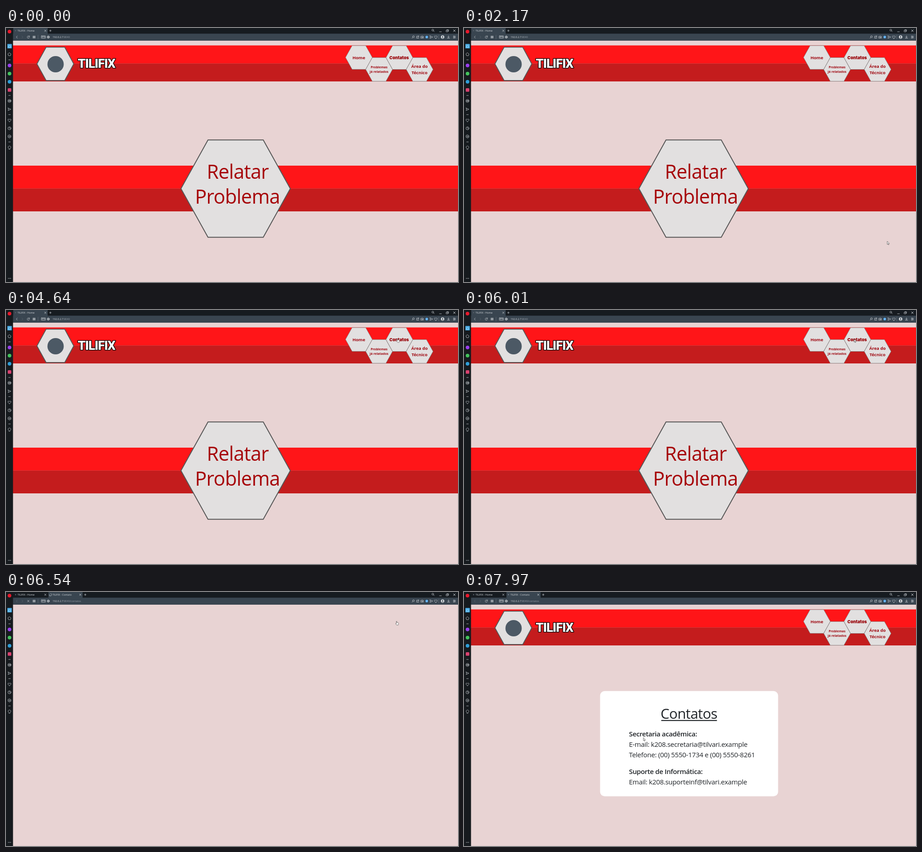
An HTML page for the animation above (8 s loop, 998 by 561 pixels).

```html
<!DOCTYPE html>
<html lang="pt-BR">
<head>
<meta charset="utf-8">
<title>Contatos</title>
<style>
html, body { margin: 0; width: 100%; height: 100%; overflow: hidden; background: #e8d3d3; }
svg { display: block; width: 100vw; height: 100vh; }
text { font-family: "Open Sans", "Noto Sans", sans-serif; }
.mid { text-anchor: middle; }
.ui { font-size: 5.6px; fill: #d9dde1; }
.dim { fill: #98a1aa; }
.ico { fill: none; stroke: #c9ced3; stroke-width: .8; stroke-linecap: round; stroke-linejoin: round; }
.off { stroke: #5c6670; }
.nav { fill: #e2e0e0; stroke: #777; stroke-width: .8; }
.link { fill: #9f0710; font-weight: 700; }
.brand { font: 900 27.5px Roboto, sans-serif; letter-spacing: -1.1px; fill: #fff; stroke: #000; stroke-width: 2.6px; paint-order: stroke; stroke-linejoin: round; }
.big { font-size: 43px; letter-spacing: -.8px; fill: #a60307; }
.body { font-size: 15px; letter-spacing: -.3px; fill: #212529; }
.body .b { font-weight: 600; letter-spacing: -.4px; }

/* hard switches */
.home, .blank, .later, .header, .card, .loading, .loaded, .arrow, .hand, .tab2 { animation: 8s step-end infinite; }
.home { animation-name: home; }
.blank { animation-name: blank; }
.later { animation-name: later; }
.tab2 { animation-name: tab; }
.header { animation-name: header; }
.card { animation-name: card; }
.loading { animation-name: loading; }
.loaded { animation-name: loaded; }
.arrow { animation-name: arrow; }
.hand { animation-name: hand; }
@keyframes home { 0% { opacity: 1 } 77.125%, 100% { opacity: 0 } }
@keyframes blank { 0% { opacity: 0 } 77.125% { opacity: 1 } 80.625%, 100% { opacity: 0 } }
@keyframes later { 0% { opacity: 0 } 80.625%, 100% { opacity: 1 } }
@keyframes tab { 0% { opacity: 0 } 77.125%, 100% { opacity: 1 } }
@keyframes header { 0% { opacity: 1 } 77.125% { opacity: 0 } 83%, 100% { opacity: 1 } }
@keyframes card { 0% { opacity: 0 } 83%, 100% { opacity: 1 } }
@keyframes loading { 0% { opacity: 0 } 77.125% { opacity: 1 } 85%, 100% { opacity: 0 } }
@keyframes loaded { 0% { opacity: 0 } 85%, 100% { opacity: 1 } }
@keyframes arrow { 0% { opacity: 0 } 23.75% { opacity: 1 } 45.5% { opacity: 0 } 73.875% { opacity: 1 } 80% { opacity: 0 } 88%, 100% { opacity: 1 } }
@keyframes hand { 0% { opacity: 0 } 45.5% { opacity: 1 } 73.875% { opacity: 0 } 80% { opacity: 1 } 88%, 100% { opacity: 0 } }

/* new tab opening */
.grow { animation: grow 8s infinite; }
.plus { animation: plus 8s infinite; }
.spot { animation: spot 8s infinite; }
.spin { animation: spin 1s linear infinite; }
@keyframes grow { 0%, 77.6% { width: 0 } 80%, 100% { width: 75.5px } }
@keyframes plus { 0%, 77.6% { transform: translateX(0) } 80%, 100% { transform: translateX(77px) } }
@keyframes spot { 0%, 77.6% { transform: translate(89px, 6px) } 80%, 100% { transform: translate(98px, 6px) } }
@keyframes spin { to { transform: rotate(360deg) } }

.cursor { animation: move 8s linear infinite; }
@keyframes move {
  0%, 23.75% { transform: translate(930px, 425px) }
  27.125%, 31.25% { transform: translate(934.5px, 471px) }
  36% { transform: translate(925px, 370px) }
  41.25% { transform: translate(909px, 226px) }
  46.25% { transform: translate(899px, 105px) }
  51.75% { transform: translate(884px, 68px) }
  55%, 58.2% { transform: translate(863.3px, 62.4px) }
  62% { transform: translate(872px, 65px) }
  67% { transform: translate(866px, 66px) }
  70%, 86.25% { transform: translate(861.3px, 64px) }
  89% { transform: translate(780px, 130px) }
  93% { transform: translate(560px, 310px) }
  95.6% { transform: translate(430px, 366px) }
  98% { transform: translate(398px, 325px) }
  99.5%, 100% { transform: translate(396px, 321.5px) }
}
</style>
</head>
<body>
<svg viewBox="0 0 998 561" preserveAspectRatio="none">
  <defs>
    <path id="hex" d="M-29.6 0L-15-26.2H15L29.6 0 15 26.2H-15Z"/>
    <path id="x" d="M-1.8-1.8L1.8 1.8M1.8-1.8L-1.8 1.8"/>
    <path id="heart" d="M0 3C-6-.8-2.8-4.6 0-1.8 2.8-4.6 6-.8 0 3Z"/>
    <path id="send" d="M-3-2.8L3.2 0-3 2.8-2 0Z"/>
    <path id="dash" d="M-2 0H2"/>
    <path id="reload" d="M2.1-1.3A2.5 2.5 0 1 0 2.4.9M2.5-2.8V-.9H.6"/>
    <path id="back" d="M1-2.3L-1.4 0 1 2.3"/>
    <path id="fwd" d="M-1-2.3L1.4 0-1 2.3"/>
    <path id="lens" d="M.8.8L2.6 2.6M1.3-.8A2 2 0 1 1-2.7-.8 2 2 0 1 1 1.3-.8"/>
    <g id="cam"><path d="M-2.8-1.6H-1.2L-.6-2.5H.6L1.2-1.6H2.8V2.3H-2.8Z"/><circle cy=".4" r="1"/></g>
    <g id="tools">
      <use href="#lens" transform="translate(899 20) scale(-1 1)"/>
      <path d="M909 18H906.7V22.5H911.2V20.8M908.5 20.5L911.4 17.6M909.7 17.6H911.4V19.3"/>
      <use href="#cam" x="919" y="20"/>
      <use href="#send" x="939" y="20"/>
      <use href="#heart" x="949" y="20.3"/>
      <circle cx="929" cy="20" r="2.9" fill="#4da6ef" stroke="none"/>
      <path d="M927.8 20L928.7 20.9 930.3 19.2" stroke="#fff"/>
    </g>
  </defs>

  <!-- pages -->
  <rect width="998" height="561" fill="#e8d3d3"/>
  <g class="blank"><rect x="15" y="28" width="983" height="533" fill="#fff"/></g>

  <g class="header">
    <rect x="15" y="38.5" width="983" height="40" fill="#ff1518"/>
    <rect x="15" y="78.3" width="983" height="39.7" fill="#c41c1d"/>
    <path d="M68.3 79.2L88.6 42.4H129.6L149.6 79.2 129.6 116H88.6Z" fill="#e2e0e0" stroke="#555" stroke-width="1.8"/>
    <circle cx="109.5" cy="80" r="18" fill="#4c5965"/>
    <text class="brand" x="158.5" y="88">TILIFIX</text>
    <use href="#hex" class="nav" x="779.2" y="65.1"/>
    <use href="#hex" class="nav" x="823.8" y="91.5"/>
    <use href="#hex" class="nav" x="868.6" y="65.3"/>
    <use href="#hex" class="nav" x="913.3" y="91.5"/>
    <g class="link mid" font-size="9.5">
      <text x="779" y="68.6">Home</text>
      <text x="823.7" y="89.1" font-size="7">Problemas</text>
      <text x="823.7" y="99" font-size="7">já relatados</text>
      <text x="868" y="68.8" style="font:900 9.3px Inter,sans-serif" fill="#980006">Contatos</text>
      <text x="913" y="88.4">Área do</text>
      <text x="913" y="101.6">Técnico</text>
    </g>
  </g>

  <g class="home">
    <rect x="15" y="304" width="983" height="50.7" fill="#ff1518"/>
    <rect x="15" y="354.5" width="983" height="50.5" fill="#c41c1d"/>
    <path d="M386.3 354.8L446 247.3H568L627.7 354.8 568 462.2H446Z" fill="#e2e0e0" stroke="#565656" stroke-width="2"/>
    <g class="big mid">
      <text x="511.5" y="332.5">Relatar</text>
      <text x="511" y="387.5">Problema</text>
    </g>
  </g>

  <g class="card">
    <rect x="300.5" y="218.8" width="393" height="232.4" rx="10" fill="#fff"/>
    <text class="mid" x="496.7" y="280" font-size="31" letter-spacing="-.6" fill="#212529">Contatos</text>
    <rect x="435.5" y="282.7" width="123" height="2.2" fill="#212529"/>
    <g class="body">
      <text class="b" x="364.3" y="319">Secretaria acadêmica:</text>
      <text x="364.3" y="342">E-mail: k208.secretaria@tilvari.example</text>
      <text x="364.3" y="364.7">Telefone: (00) 5550-1734 e (00) 5550-8261</text>
      <text class="b" x="364.3" y="402.4">Suporte de Informática:</text>
      <text x="364.3" y="425.2">Email: k208.suporteinf@tilvari.example</text>
    </g>
  </g>

  <!-- tab strip -->
  <rect width="998" height="13" fill="#161b20"/>
  <rect x="15" y="12.5" width="983" height="15.5" fill="#394550"/>
  <g class="home"><rect x="16" y="0" width="76" height="13" fill="#394550"/></g>
  <g class="tab2"><rect class="grow" x="93.7" y="0" height="13" fill="#394550"/></g>
  <rect x="20" y="4.7" width="2.4" height="2.4" fill="#59616a"/>
  <text class="ui" x="25.6" y="8.1">TILIFIX - Home</text>
  <g class="later">
    <text class="ui" x="102.5" y="8.1">TILIFIX - Contato</text>
    <use href="#x" class="ico" x="164" y="6"/>
  </g>
  <g class="loaded"><rect x="97" y="4.7" width="2.4" height="2.4" fill="#737b84"/></g>
  <g class="loading ico"><g class="spot"><path class="spin" d="M0 2.6A2.6 2.6 0 1 1 2.6 0"/></g></g>
  <g class="ico">
    <use href="#x" x="86.8" y="6"/>
    <path class="plus" d="M96 6H100M98 4V8"/>
    <use href="#lens" x="943" y="5.5"/>
    <path d="M957 8.3H961.5M972.2 5H975.8V8.4H972.2ZM973.5 5V3.7H977.1V7.1H975.8"/>
    <use href="#x" x="990" y="6" transform="translate(-198 -1.2) scale(1.2)"/>
  </g>

  <!-- address bar -->
  <g class="ico">
    <path d="M59.8 17.8H61.6V19.4H59.8ZM62.8 17.8H64.6V19.4H62.8ZM59.8 20.6H61.6V22.2H59.8ZM62.8 20.6H64.6V22.2H62.8Z"/>
    <path d="M70.8 15.5V24.5M955.5 15.5V24.5" stroke="#65707a"/>
    <rect x="78" y="17.2" width="9.2" height="5.4" rx=".6"/>
    <circle cx="93.4" cy="20" r="2.6"/>
    <path d="M90.8 20H96M93.4 17.4Q91 20 93.4 22.6Q95.8 20 93.4 17.4"/>
    <use href="#fwd" class="off" x="36" y="20"/>
    <path d="M977 17V21M975.3 19.4L977 21.2 978.7 19.4M974.4 22.6H979.6M987.6 18H992.4M987.6 20H992.4M987.6 22H992.4M989 17.4V18.6M991 19.4V20.6M989 21.4V22.6"/>
  </g>
  <text x="82.6" y="21.4" class="mid" font-size="3.8" font-weight="700" fill="#c9ced3">VPN</text>
  <circle cx="964" cy="20" r="3.7" fill="#e3e6e9"/>
  <circle cx="964" cy="18.9" r="1.3" fill="#394550"/>
  <path d="M961.6 22.4Q964 19.2 966.4 22.4Z" fill="#394550"/>

  <g class="home">
    <use href="#back" class="ico" x="24" y="20"/>
    <use href="#reload" class="ico" x="49.3" y="20"/>
    <text class="ui" x="103" y="22">192.0.2.7<tspan class="dim">:8040</tspan></text>
    <use href="#tools" class="ico"/>
  </g>
  <g class="blank">
    <use href="#back" class="ico off" x="24" y="20"/>
    <text class="ui" x="102.7" y="22">Digite a pesquisa ou o endereço da Web</text>
    <use href="#cam" class="ico" x="949" y="20"/>
  </g>
  <g class="later">
    <use href="#back" class="ico off" x="24" y="20"/>
    <text class="ui" x="103" y="22">192.0.2.7<tspan class="dim">:8040/contatos</tspan></text>
    <use href="#tools" class="ico"/>
  </g>
  <g class="loading"><use href="#x" class="ico" x="49.3" y="20"/></g>
  <g class="loaded"><use href="#reload" class="ico" x="49.3" y="20"/></g>

  <!-- sidebar -->
  <rect width="15.5" height="561" fill="#161a1e"/>
  <circle cx="7.7" cy="8" r="4" fill="#e8192c"/>
  <rect x="3" y="35.3" width="9.8" height="9.8" rx="1" fill="#47a9e3"/>
  <circle cx="7.8" cy="82.8" r="4" fill="#9a3ff0"/>
  <circle cx="7.8" cy="100.8" r="4" fill="#43c35c"/>
  <circle cx="7.8" cy="118.8" r="4" fill="#2f9fd9"/>
  <rect x="3.9" y="133" width="7.8" height="7.8" rx="1.6" fill="#d9416f"/>
  <g class="ico">
    <path d="M5.5 42.3V39.6L7.8 37.8 10.1 39.6V42.3Z" stroke="#b9e2fa"/>
    <path d="M7.7 54.7L11 57.4 9.8 61.2H5.6L4.4 57.4Z"/>
    <use href="#dash" x="7.7" y="70.3"/>
    <use href="#dash" x="7.7" y="149"/>
    <circle cx="7.7" cy="161" r="3.4"/>
    <circle cx="6.7" cy="161" r="1"/>
    <path d="M8.8 160L10 161 8.8 162Z"/>
    <use href="#send" x="7.7" y="179.5"/>
    <use href="#dash" x="7.7" y="191.3"/>
    <use href="#heart" x="7.7" y="204"/>
    <circle cx="7.7" cy="221.6" r="3.3"/>
    <path d="M7.7 219.5V221.8L9.2 222.6"/>
    <path d="M7.7 236L10.8 237.8V241.3L7.7 243.1 4.6 241.3V237.8Z"/>
    <circle cx="7.7" cy="239.6" r="1.2"/>
    <use href="#dash" x="7.7" y="251.7"/>
    <path d="M6.5 266.3C3.4 264 4.8 260.6 7.7 260.6S12 264 8.9 266.3V267.8H6.5Z"/>
  </g>
  <g fill="#c9ced3">
    <circle cx="5.3" cy="553" r=".8"/>
    <circle cx="7.8" cy="553" r=".8"/>
    <circle cx="10.3" cy="553" r=".8"/>
  </g>

  <g class="cursor" fill="#fff" stroke="#222" stroke-width=".6" stroke-linejoin="round">
    <path class="arrow" d="M0 0V6.9L1.5 5.6 2.6 8 3.6 7.5 2.6 5.2H4.7Z"/>
    <path class="hand" d="M.5.8Q1.2-.2 1.8.8V3.4L4.6 4Q5.6 4.3 5.4 5.4L4.7 9H1.3L-1 5.9Q-.8 4.9.5 6Z"/>
  </g>
</svg>
</body>
</html>
```
